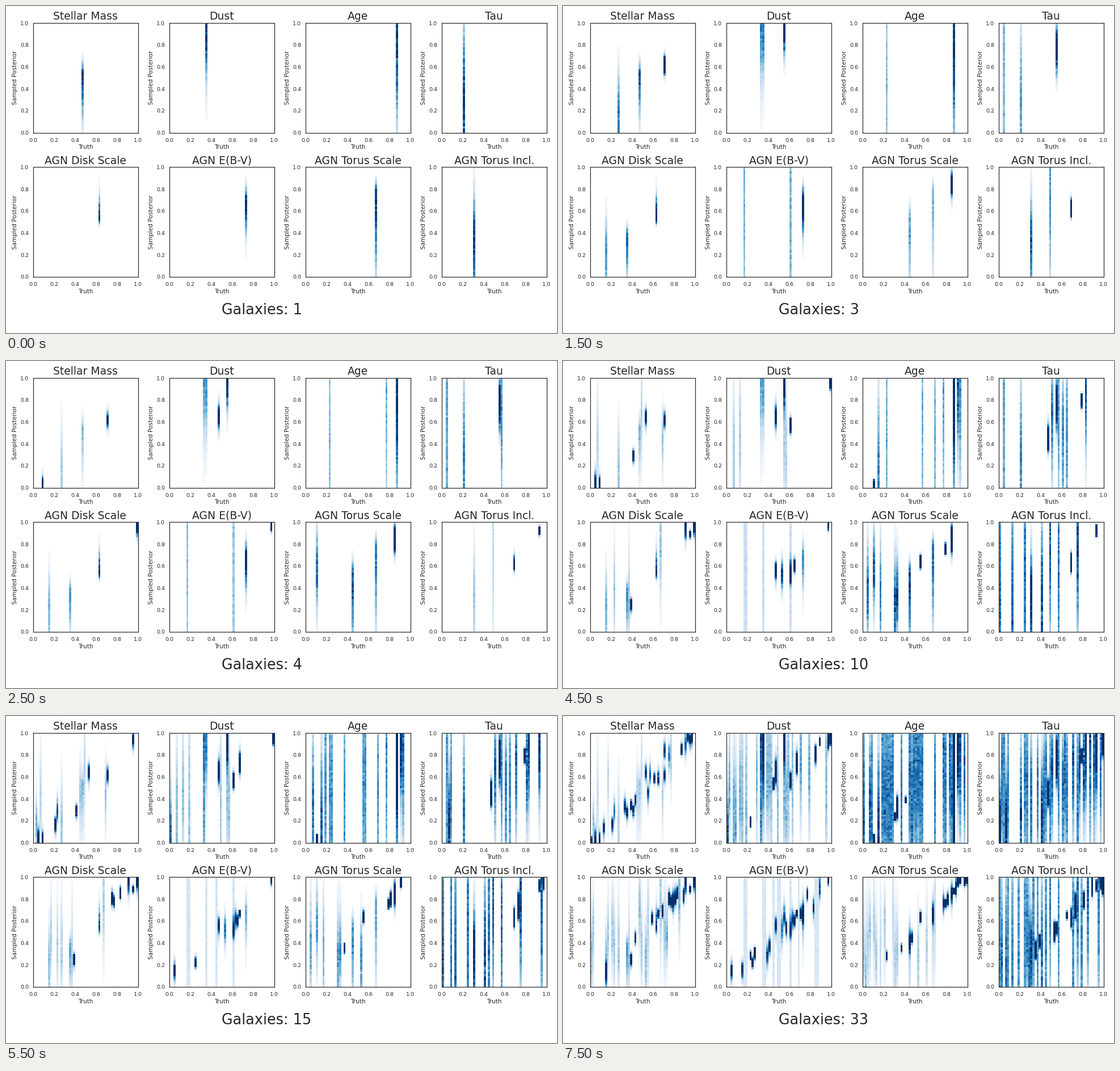
Animation, 971 px wide and 577 px high, one loop 8000 ms. Source, as a matplotlib script:

```python
import numpy as np
import matplotlib.pyplot as plt
from matplotlib.animation import FuncAnimation

W, H, DPI = 971, 577, 64
BINS = 50
STEPS = 9
INK = "#262626"
FLAT = 99

plt.rcParams["font.family"] = "DejaVu Sans"
fig = plt.figure(figsize=(W / DPI, H / DPI), dpi=DPI, facecolor="white")
centres = (np.arange(BINS) + 0.5) * 100 / BINS
# The sample grows by about half at every step.
counts = [int(1.478 ** (k + 1)) for k in range(STEPS)]
panels = []


def pt(px):
    return px * 72 / DPI


def label(x, y, text, size, **kw):
    """Text with its baseline at pixel (x, y), y counted from the top."""
    kw = {"ha": "center", "va": "baseline", "color": INK, **kw}
    return fig.text(x / W, 1 - y / H, text, fontsize=pt(size), **kw)


def posterior(rng, peak, down, up):
    """Unit-mass column: a noisy bell with separate widths below and above."""
    width = np.where(centres < peak, down, up)
    p = np.exp(-0.5 * ((centres - peak) / width) ** 2)
    p *= np.clip(1 + 0.12 * rng.standard_normal(BINS), 0.3, 1.7)
    return p / p.sum()


def random_shape(rng, truth, tight, loose):
    """Either a narrow peak near the truth or a broad, uninformative bell."""
    if rng.random() < tight[0] + (tight[1] - tight[0]) * truth / 100:
        peak = truth + 6 * rng.standard_normal()
        widths = rng.uniform(1, 7) * rng.uniform(0.7, 1.5, 2)
    else:
        peak = 25 + truth / 2 + 15 * rng.standard_normal()
        widths = loose * rng.uniform(0.6, 1.4, 2)
    return np.clip(peak, 1, 99), *widths


def sample_states(rng, first, tight, loose):
    """Histogram after each step; `first` fixes the opening columns."""
    bins = rng.permutation(BINS)
    grid = np.zeros((BINS, BINS))
    states = []
    for n in range(counts[-1]):
        if n < len(first):
            b, *shape = first[n]
        else:
            b = bins[n]
            shape = random_shape(rng, centres[b], tight, loose)
        grid[:, b] += posterior(rng, *shape)
        if n + 1 in counts:
            states.append(np.ma.masked_less(grid.copy(), 0.001))
    return states


def panel(title, tight, loose, *first):
    """Add a panel.

    tight: chance of a narrow posterior at truth 0 and at truth 1
    loose: typical width of the broad ones, in percent
    first: opening columns as (bin, peak, width below, width above)
    """
    index = len(panels)
    row, col = divmod(index, 4)
    left, top, w, h = 48 + 240 * col, 30 + 254.4 * row, 184.8, 193.5
    bottom, mid = top + h, left + w / 2

    ax = fig.add_axes([left / W, 1 - bottom / H, w / W, h / H])
    ax.set(xticks=[], yticks=[])
    for spine in ax.spines.values():
        spine.set(color=INK, linewidth=pt(1.2))
    label(mid, top - 5.7, title, 18.8)
    label(mid, bottom + 28.7, "Truth", 10.4)
    label(left - 28.8, top + h / 2, "Sampled Posterior", 10.4,
          rotation=90, rotation_mode="anchor")
    for v in np.linspace(0, 1, 6):
        label(left + v * w, bottom + 16.4, f"{v:.1f}", 9.45)
        label(left - 7.6, bottom - v * h + 3.5, f"{v:.1f}", 9.45, ha="right")

    states = sample_states(np.random.default_rng(index), first, tight, loose)
    image = ax.imshow(states[0], cmap="Blues", origin="lower", aspect="auto",
                      extent=(0, 1, 0, 1), interpolation="nearest")
    panels.append((image, states))


panel("Stellar Mass", (0.6, 0.9), 20,
      (23, 52, 24, 8), (35, 62, 5, 5), (13, 20, 40, 22))
panel("Dust", (0.3, 0.4), 45,
      (17, 90, 28, 30), (27, 92, 14, 20), (16, 98, 35, 9))
panel("Age", (0.15, 0.15), 65,
      (43, 85, 50, 40), (11, 40, FLAT, FLAT), (43, 70, 60, 60))
panel("Tau", (0.15, 0.35), 50,
      (10, 30, 70, 45), (27, 73, 13, 18), (2, 50, FLAT, FLAT))
panel("AGN Disk Scale", (0, 1), 24,
      (31, 53, 3, 13), (17, 37, 26, 6), (7, 25, 30, 18))
panel("AGN E(B-V)", (0.2, 0.9), FLAT,
      (36, 68, 18, 9), (8, 60, FLAT, FLAT), (30, 50, FLAT, FLAT))
panel("AGN Torus Scale", (0, 1), 26,
      (33, 76, 45, 7), (42, 85, 8, 7), (22, 52, 40, 8))
panel("AGN Torus Incl.", (0.2, 0.3), 80,
      (15, 35, 40, 26), (24, 80, 60, 40), (34, 61, 3.5, 5))

counter = label(379.8, 543.9, "", 25.5, ha="left")


def update(i):
    step = (i + 1) // 2
    for image, states in panels:
        state = states[step]
        image.set_data(state)
        # The brightest few percent saturate.
        image.set_clim(0, np.percentile(state.compressed(), 93))
    counter.set_text(f"Galaxies: {counts[step]}")
    return [counter]


anim = FuncAnimation(fig, update, frames=16, interval=500, repeat=True,
                     repeat_delay=0, blit=False)
plt.show()
```
